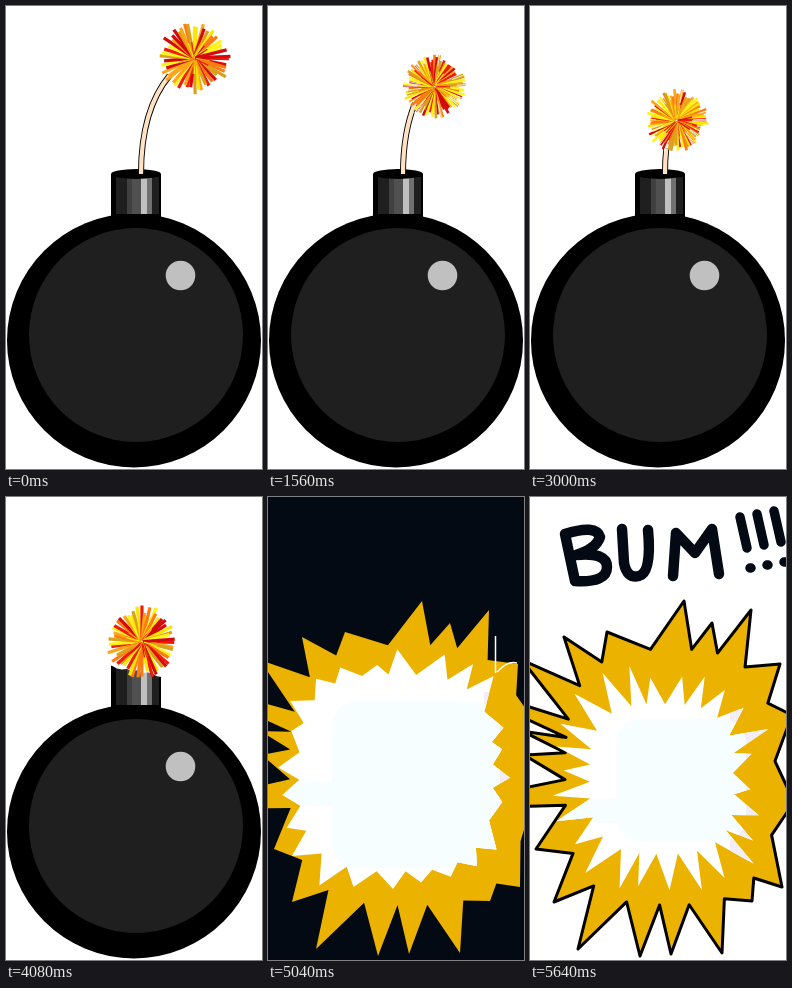
Animation, 256 px wide and 463 px high, one loop 5.76 s. Source, as an HTML page with a canvas:

```html
<!DOCTYPE html>
<html lang="en">
<head>
<meta charset="utf-8">
<title>Bomb</title>
<style>
html, body { margin: 0; width: 100%; height: 100%; overflow: hidden; background: #fff; }
canvas { display: block; width: 256px; height: 463px; }
</style>
</head>
<body>
<canvas id="stage" width="256" height="463"></canvas>
<script>
const ctx = document.getElementById('stage').getContext('2d');
const STEP = 120, STEPS = 48, BLAST = 36;
const TAU = Math.PI * 2;
const INK = '#030a14', GOLD = '#ecb200', ICE = '#f7feff', LILAC = '#f3eef6';
const HOT = ['#d40a0a', '#f01c08', '#ff7a10', '#ffa518', '#ffe600', '#fff21a', '#d9a21c'];

function random(seed) {
  let s = seed * 7919 + 17;
  return () => {
    s = (s * 16807) % 2147483647;
    return s / 2147483647;
  };
}

function fill(path, color) {
  ctx.fillStyle = color;
  ctx.fill(path);
}

function stroke(path, color, width) {
  ctx.strokeStyle = color;
  ctx.lineWidth = width;
  ctx.stroke(path);
}

function disc(x, y, rx, color, ry = rx) {
  const path = new Path2D();
  path.ellipse(x, y, rx, ry, 0, 0, TAU);
  fill(path, color);
}

function bar(x, y, w, h, color) {
  ctx.fillStyle = color;
  ctx.fillRect(x, y, w, h);
}

function polygon(points) {
  return new Path2D('M' + points.map(p => p.join(' ')).join('L') + 'Z');
}

// Point on a squarish oval, in the direction (dx, dy) from its centre.
function onRim(dx, dy, [cx, cy, rx, ry]) {
  const k = 1 / Math.cbrt(Math.abs(dx / rx) ** 3 + Math.abs(dy / ry) ** 3);
  return [cx + dx * k, cy + dy * k];
}

// Spikes with the given tips; the valleys between them lie on the oval.
function burst(tips, oval) {
  const [cx, cy] = oval;
  return polygon(tips.flatMap(([x, y], i) => {
    const [nx, ny] = tips[(i + 1) % tips.length];
    return [[x, y], onRim((x + nx) / 2 - cx, (y + ny) / 2 - cy, oval)];
  }));
}

function core(oval, count, depth, seed) {
  const [cx, cy, rx, ry] = oval;
  const rnd = random(seed);
  const tips = Array.from({ length: count }, (_, i) => {
    const a = (i + 0.5 * rnd()) / count * TAU;
    const k = 0.9 + 0.14 * rnd();
    return onRim(Math.cos(a), Math.sin(a), [cx, cy, rx * k, ry * k]);
  });
  return burst(tips, [cx, cy, rx * depth, ry * depth]);
}

const flameTips = [
  [154, 104], [182, 126], [221, 113], [250, 167], [262, 218], [264, 305], [252, 390],
  [222, 404], [192, 456], [141, 457], [110, 459], [48, 452], [24, 405], [6, 352],
  [-110, 312], [-6, 258], [-8, 234], [-90, 182], [-8, 163], [34, 140], [77, 135]
];
const wideFlame = burst(flameTips, [140, 278, 118, 130]);
const sharpFlame = burst(flameTips, [140, 280, 105, 128]);
const bigCore = core([128, 276, 118, 120], 24, 0.82, 5);
const smallCore = core([132, 282, 106, 110], 26, 0.68, 8);

const fuse = new Path2D('M135 168C135 130 142 95 164 69');
const letters = new Path2D(`M35 37L45 84M35 37Q66 27 70 40Q66 52 46 58Q77 55 77 70Q77 86 45 84
  M92 32L94 66Q97 82 109 79Q122 76 118 33M143 79L146 36 165 56 182 32 189 77`);

function sparkAt(i) {
  const u = i / (BLAST - 1), bend = Math.sin(Math.PI * u);
  return [188 - 53 * (u + 0.12 * u * bend), 52 + 96 * (u - 0.08 * bend)];
}

function bomb() {
  disc(128, 334.5, 127, '#000');
  bar(105, 168, 50, 48, '#000');
  const bands = [[110, 11, '#1f1f1f'], [121, 5, '#404040'], [126, 9, '#505050'],
    [135, 6, '#c0c0c0'], [141, 5, '#707070'], [146, 7, '#1f1f1f']];
  for (const [x, w, color] of bands) bar(x, 171, w, 37, color);
  disc(130, 168, 25, '#000', 5);
  disc(130, 329, 107, '#1f1f1f');
  disc(174.5, 269.5, 14.8, '#c0c0c0');
}

// The spark wipes out whatever lies above its ragged, slanting lower edge.
function burntEdge(x, y) {
  const rnd = random(4);
  const edge = [[x + 40, y - 30], [x - 40, y - 30]];
  for (let dx = -40; dx <= 40; dx += 5) {
    edge.push([x + dx, y + 29 + dx * 0.2 + rnd() * 3]);
  }
  fill(polygon(edge), '#fff');
}

function drawFuse(top) {
  ctx.save();
  ctx.beginPath();
  ctx.rect(0, top, 256, 200);
  ctx.clip();
  ctx.lineCap = 'butt';
  stroke(fuse, '#000', 6);
  stroke(fuse, '#ffe2c4', 4.2);
  ctx.restore();
}

function ray(angle, from, to, color, width) {
  const c = Math.cos(angle), s = Math.sin(angle);
  stroke(new Path2D(`M${c * from} ${s * from}L${c * to} ${s * to}`), color, width);
}

function spark(i, x, y) {
  const rnd = random(i + 3);
  const dense = i % 2 === 1;
  const count = dense ? 76 : 50;
  const reach = dense ? 32 : 37;
  ctx.save();
  ctx.translate(x, y);
  ctx.lineCap = 'butt';
  for (let k = 0; k < count; k++) {
    const angle = (k + rnd() * 0.7) / count * TAU;
    const color = HOT[Math.floor(rnd() * HOT.length)];
    ray(angle, 1, reach * (0.76 + 0.24 * rnd()), color, dense ? 2.6 : 3.2);
  }
  if (dense) {
    for (let k = 0; k < 26; k++) ray(rnd() * TAU, 13 + rnd() * 10, 33, '#fff', 0.8);
  }
  for (let k = 0; k < 12; k++) ray(rnd() * TAU, 2, 16, HOT[k % HOT.length], 1.2);
  ctx.restore();
}

function heart(shape, [x, y, w, h]) {
  const haze = new Path2D();
  haze.roundRect(x, y, w, h, 24);
  haze.rect(x - 54, y + 80, 60, 24);
  fill(shape, '#fff');
  ctx.save();
  ctx.clip(shape);
  bar(x + w - 16, y - 10, 40, h + 30, LILAC);
  fill(haze, ICE);
  ctx.restore();
}

function darkBlast() {
  bar(0, 0, 256, 463, INK);
  fill(wideFlame, GOLD);
  heart(bigCore, [64, 205, 168, 166]);
  ctx.lineCap = 'butt';
  stroke(new Path2D('M227.5 139V176M229 175Q240 163 249 166'), '#fff', 1.5);
}

function exclamations() {
  for (let k = 0; k < 3; k++) {
    const x = 210 + 17 * k, y = 20 - 3 * k;
    stroke(new Path2D(`M${x} ${y}L${x + 7} ${y + 31}M${x + 10} ${y + 51}h1`), INK, 9.5);
  }
}

function lightBlast() {
  ctx.lineJoin = ctx.lineCap = 'round';
  fill(sharpFlame, GOLD);
  stroke(sharpFlame, '#000', 3);
  heart(smallCore, [86, 222, 130, 122]);
  fill(new Path2D('M203 276L240 238 250 320Z'), GOLD);
  stroke(letters, INK, 10.5);
  exclamations();
}

function draw(i) {
  bar(0, 0, 256, 463, '#fff');
  if (i >= BLAST) {
    if (i % 2) lightBlast();
    else darkBlast();
    return;
  }
  const [x, y] = sparkAt(i);
  bomb();
  burntEdge(x, y);
  drawFuse(y + 16 + Math.max(0, i - 13));
  spark(i, x, y);
}

let shown = -1;
const start = performance.now();
function tick() {
  const i = Math.floor((performance.now() - start) / STEP) % STEPS;
  if (i !== shown) draw(shown = i);
  requestAnimationFrame(tick);
}
tick();
</script>
</body>
</html>
```
